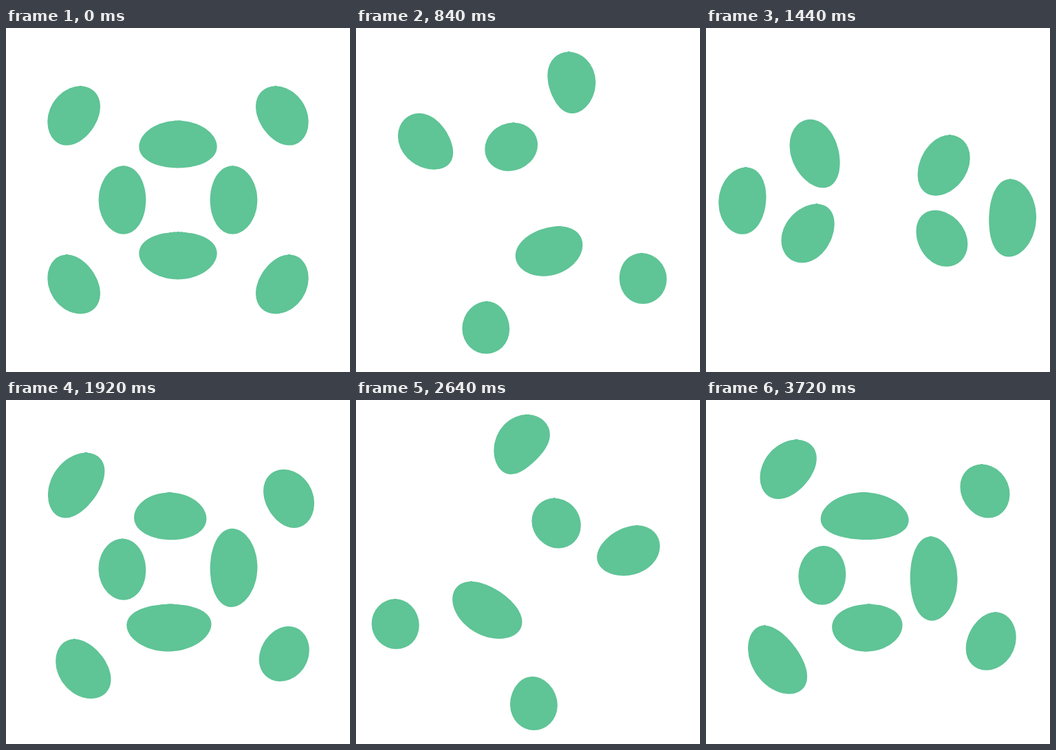
Recreate the animation shown at these times as an HTML page with a canvas. Size 500 by 500 pixels, loop 3780 ms.

```html
<!DOCTYPE html>
<html lang="en">
<head>
<meta charset="utf-8">
<title>Sliced knot</title>
<style>
  html, body { margin: 0; width: 100%; height: 100%; overflow: hidden; background: #fff; }
  canvas { display: block; }
</style>
</head>
<body>
<canvas id="stage" width="500" height="500"></canvas>
<script>
const ctx = document.getElementById('stage').getContext('2d');
const { sin, cos, PI, sqrt, floor } = Math;
const STEP = 60, STEPS = 63, TURN = 0.1;
const TUBE = 34.4, SAMPLES = 4000;

// Closed knot: three turns around the axis, four through the hole.
const knot = Array.from({ length: SAMPLES }, (_, i) => {
  const t = i / SAMPLES * 2 * PI;
  return [
    58 * cos(t) - 139 * cos(3 * t),
    58 * sin(t) + 139 * sin(3 * t),
    103 * sin(4 * t) + 23 * sin(2 * t)
  ];
});

const dot = (p, q) => p[0] * q[0] + p[1] * q[1] + p[2] * q[2];

// The tube is a union of spheres; each one cuts the plane in a circle.
function draw(angle) {
  const s = sin(angle), c = cos(angle);
  const s2 = sin(2 * angle), c2 = cos(2 * angle);
  const right = [c, -s * s2, s * c2];
  const down = [0, c2, s2];
  const normal = [-s, -c * s2, c * c2];

  ctx.fillStyle = '#fff';
  ctx.fillRect(0, 0, 500, 500);
  ctx.fillStyle = '#5fc496';
  ctx.beginPath();
  for (const p of knot) {
    const h = dot(p, normal);
    if (h * h >= TUBE * TUBE) continue;
    const r = sqrt(TUBE * TUBE - h * h);
    const x = 250 + dot(p, right), y = 250 + dot(p, down);
    ctx.moveTo(x + r, y);
    ctx.arc(x, y, r, 0, 2 * PI);
  }
  ctx.fill();
}

const start = performance.now();
let shown = -1;
function tick() {
  const step = floor((performance.now() - start) / STEP) % STEPS;
  if (step !== shown) draw(TURN * (shown = step));
  requestAnimationFrame(tick);
}
tick();
</script>
</body>
</html>
```
